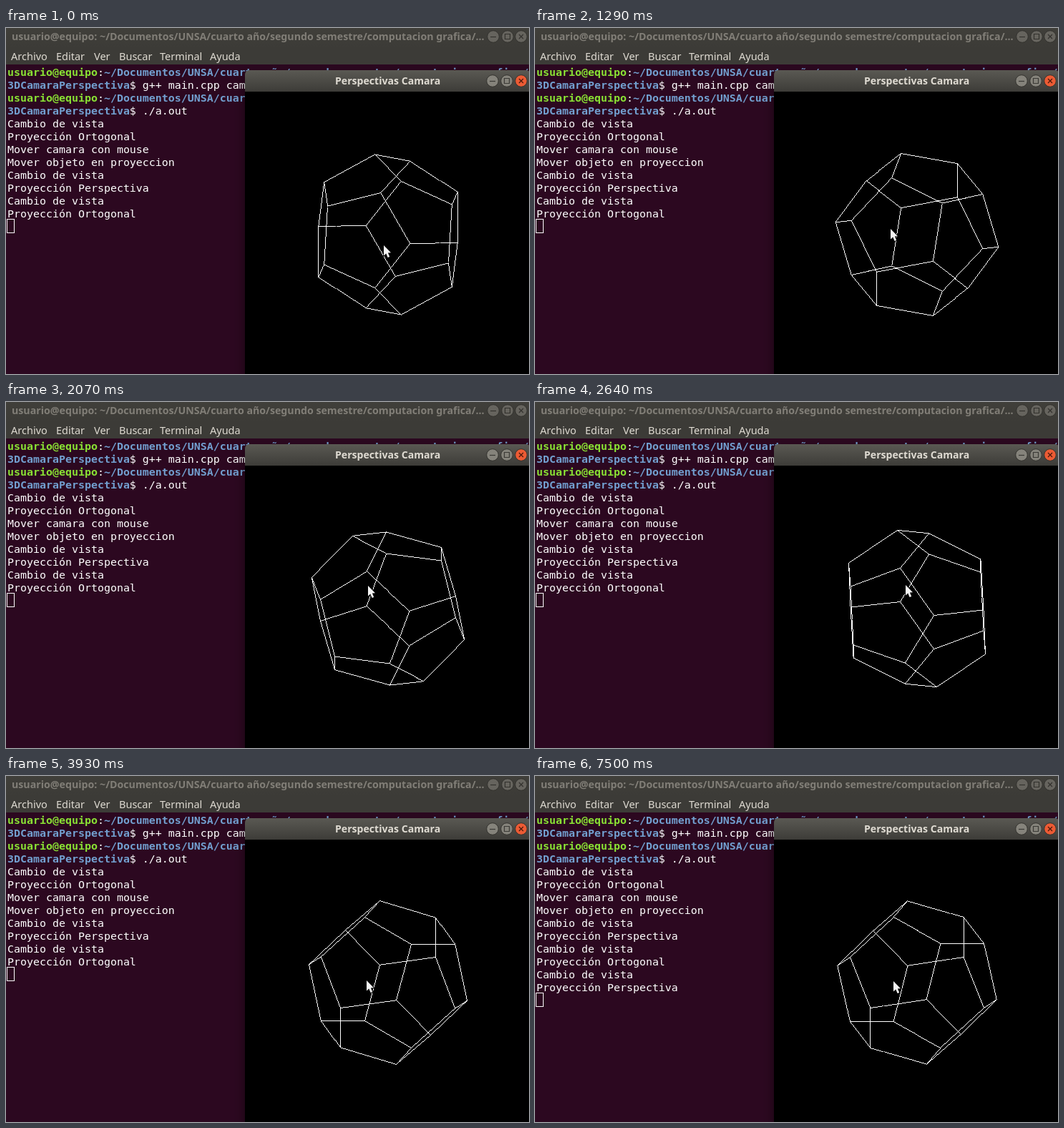
An HTML page with a canvas for the animation above (8000 ms loop, 731 px wide and 484 px high).

```html
<!DOCTYPE html>
<html lang="es">
<head>
<meta charset="utf-8">
<title>Perspectivas Camara</title>
<style>
html, body { margin: 0; width: 731px; height: 484px; overflow: hidden; background: #000; }
canvas { display: block; }
</style>
</head>
<body>
<canvas id="stage" width="731" height="484"></canvas>
<script>
const ctx = document.getElementById('stage').getContext('2d');
const LOOP = 8000, TICK = 1000 / 14;
const PERSPECTIVE_ON = 71, TEXT_ON = 77, PERSPECTIVE_OFF = 105;
const UNIT = 66.8, CX = 534, CY = 289, FOCAL = 346.4, DISTANCE = 3.165;
const PHI = (1 + Math.sqrt(5)) / 2;
const MONO = '14.95px "DejaVu Sans Mono", monospace';
const SANS = '"Noto Sans", sans-serif';
const GREEN = '#8ae234', BLUE = '#729fcf', WHITE = '#ffffff';

// tick, yaw, pitch (degrees); equal neighbours are pauses of the drag
const POSES = [
  [0, 64, 30.4], [9, 64, 30.4], [13, 47.2, 30.8], [20, 25, 65], [21, 25, 65],
  [24, 23.9, 74.7], [31, 51.4, 77.9], [32, 51.4, 77.9], [34, 52.4, 77.8],
  [36, 52.4, 77.8], [37, 55.3, 77.4], [39, 57.7, 73.5], [40, 57.7, 73.5],
  [41, 58.5, 73], [42, 58.5, 73], [49, 41, 49], [54, 41, 49], [55, 38, 47.9],
  [56, 37.7, 47.8], [58, 37.7, 47.8], [60, 37, 47.4], [200, 37, 47.4]
];

function poseAt(tick) {
  const i = Math.max(1, POSES.findIndex(p => p[0] >= tick));
  const [a, b] = [POSES[i - 1], POSES[i]];
  const k = Math.max(0, (tick - a[0]) / (b[0] - a[0]));
  return { yaw: a[1] + (b[1] - a[1]) * k, pitch: a[2] + (b[2] - a[2]) * k };
}

const vertices = [];
const signs = [-1, 1];
for (const a of signs) for (const b of signs) {
  for (const c of signs) vertices.push([a, b, c]);
  const p = a / PHI, q = b * PHI;
  vertices.push([p, q, 0], [q, 0, p], [0, p, q]);
}
const edges = [];
vertices.forEach((v, i) => vertices.forEach((w, j) => {
  const length = Math.hypot(v[0] - w[0], v[1] - w[1], v[2] - w[2]);
  if (i < j && length < 1.3) edges.push([i, j]);
}));

function project([x, y, z], pose, perspective) {
  const yaw = pose.yaw * Math.PI / 180, pitch = pose.pitch * Math.PI / 180;
  const c = Math.cos(yaw), s = Math.sin(yaw);
  const turned = x * s - z * c;
  const depth = y * Math.sin(pitch) + turned * Math.cos(pitch);
  const scale = perspective ? FOCAL / (DISTANCE - depth) : UNIT;
  return [
    CX + (x * c + z * s) * scale,
    CY + (turned * Math.sin(pitch) - y * Math.cos(pitch)) * scale
  ];
}

// One-pixel line without smoothing
function hardLine([x0, y0], [x1, y1]) {
  const n = Math.max(1, Math.round(Math.max(Math.abs(x1 - x0), Math.abs(y1 - y0))));
  for (let i = 0; i <= n; i++) {
    ctx.fillRect(Math.floor(x0 + (x1 - x0) * i / n), Math.floor(y0 + (y1 - y0) * i / n), 1, 1);
  }
}

function text(str, x, y, color, font) {
  ctx.font = font;
  ctx.fillStyle = color;
  ctx.fillText(str, x, y);
  return x + ctx.measureText(str).width;
}

function termLine(row, parts) {
  let x = 2;
  for (const [str, color, bold] of parts) {
    x = text(str, x, 67 + 18 * row, color, (bold ? 'bold ' : '') + MONO);
  }
}

function verticalFade(y0, y1, top, bottom) {
  const g = ctx.createLinearGradient(0, y0, 0, y1);
  g.addColorStop(0, top);
  g.addColorStop(1, bottom);
  return g;
}

function button(x, y, kind, fill, rim, mark) {
  ctx.beginPath();
  ctx.arc(x, y, 8.3, 0, 7);
  ctx.fillStyle = fill;
  ctx.fill();
  ctx.lineWidth = 1;
  ctx.strokeStyle = rim;
  ctx.stroke();
  ctx.strokeStyle = mark;
  ctx.lineWidth = 1.2;
  ctx.beginPath();
  if (kind === 'min') { ctx.moveTo(x - 4, y + .5); ctx.lineTo(x + 4, y + .5); }
  if (kind === 'max') ctx.rect(x - 3.5, y - 3.5, 7, 7);
  if (kind === 'close') {
    for (const d of signs) { ctx.moveTo(x - 3, y - 3 * d); ctx.lineTo(x + 3, y + 3 * d); }
  }
  ctx.stroke();
}

function drawTerminal(tick) {
  ctx.fillStyle = '#2c0820';
  ctx.fillRect(0, 0, 731, 484);
  ctx.fillStyle = verticalFade(0, 28, '#403f3a', '#3c3b37');
  ctx.fillRect(0, 0, 731, 51);
  text('usuario@equipo: ~/Documentos/UNSA/cuarto año/segundo semestre/computacion grafica/...',
    8, 17, '#817e77', 'bold 14.2px ' + SANS);
  ['min', 'max', 'close'].forEach((kind, i) =>
    button([681, 701, 720][i], 12, kind, '#66645e', '#33322e', '#33322e'));
  const menu = { Archivo: 7, Editar: 70, Ver: 123, Buscar: 158, Terminal: 215, Ayuda: 285 };
  for (const name in menu) text(name, menu[name], 45, '#dfdbd2', '14.5px ' + SANS);

  const prompt = [
    ['usuario@equipo', GREEN, true], [':', WHITE],
    ['~/Documentos/UNSA/cuarto año/segundo semestre/computacion grafica/', BLUE, true]
  ];
  ['$ g++ main.cpp cam', '$ ./a.out'].forEach((command, i) => {
    termLine(i * 2, prompt);
    termLine(i * 2 + 1, [['3DCamaraPerspectiva', BLUE, true], [command, WHITE]]);
  });
  const change = 'Cambio de vista', ortho = 'Proyección Ortogonal', persp = 'Proyección Perspectiva';
  const output = [change, ortho, 'Mover camara con mouse', 'Mover objeto en proyeccion',
    change, persp, change, ortho];
  if (tick >= TEXT_ON) output.push(change, persp);
  output.forEach((str, i) => termLine(4 + i, [[str, WHITE]]));
  ctx.strokeStyle = WHITE;
  ctx.lineWidth = 1;
  ctx.strokeRect(1.5, 51.5 + 18 * (4 + output.length), 10, 19);
}

function drawWindow() {
  ctx.save();
  ctx.shadowColor = 'rgba(0,0,0,.5)';
  ctx.shadowBlur = 14;
  ctx.fillStyle = '#000';
  ctx.fillRect(334, 66, 420, 440);
  ctx.restore();
  ctx.beginPath();
  ctx.roundRect(334, 59, 399, 36, [6, 6, 0, 0]);
  ctx.fillStyle = verticalFade(59, 89, '#5a5953', '#3d3c38');
  ctx.fill();
  ctx.fillStyle = '#000';
  ctx.fillRect(334, 89, 397, 395);
  text('Perspectivas Camara', 460, 79, '#dfdbd2', 'bold 14.1px ' + SANS);
  button(680, 74, 'min', '#85837b', '#34332f', '#3a3935');
  button(700, 74, 'max', '#85837b', '#34332f', '#3a3935');
  button(720, 74, 'close', '#ec5b34', '#34332f', '#47180c');
}

function drawSolid(tick) {
  const perspective = tick >= PERSPECTIVE_ON && tick < PERSPECTIVE_OFF;
  const pose = poseAt(tick);
  const points = vertices.map(v => project(v, pose, perspective));
  ctx.save();
  ctx.beginPath();
  ctx.rect(334, 89, 397, 395);
  ctx.clip();
  ctx.fillStyle = WHITE;
  for (const [i, j] of edges) hardLine(points[i], points[j]);
  ctx.restore();
}

// The pointer drags one degree per pixel and trails the solid slightly
function drawPointer(tick) {
  const pose = poseAt(Math.max(0, tick - .5));
  ctx.save();
  ctx.translate(Math.round(464 + pose.yaw), Math.round(334 - pose.pitch));
  ctx.beginPath();
  for (const [x, y] of [[0, 0], [0, 14.5], [3.3, 11.6], [5.6, 17], [8.2, 15.9], [5.9, 10.6], [10, 10.3]]) {
    ctx.lineTo(x, y);
  }
  ctx.closePath();
  ctx.strokeStyle = '#000';
  ctx.lineWidth = 2;
  ctx.stroke();
  ctx.fillStyle = '#f4f4f4';
  ctx.fill();
  ctx.restore();
}

let shown = -1;
const start = performance.now();
function frame() {
  const time = (performance.now() - start) % LOOP;
  const tick = Math.floor((time + 5) / TICK);
  if (tick !== shown) {
    shown = tick;
    drawTerminal(tick);
    drawWindow();
    drawSolid(tick);
    drawPointer(tick);
  }
  requestAnimationFrame(frame);
}
frame();
</script>
</body>
</html>
```
